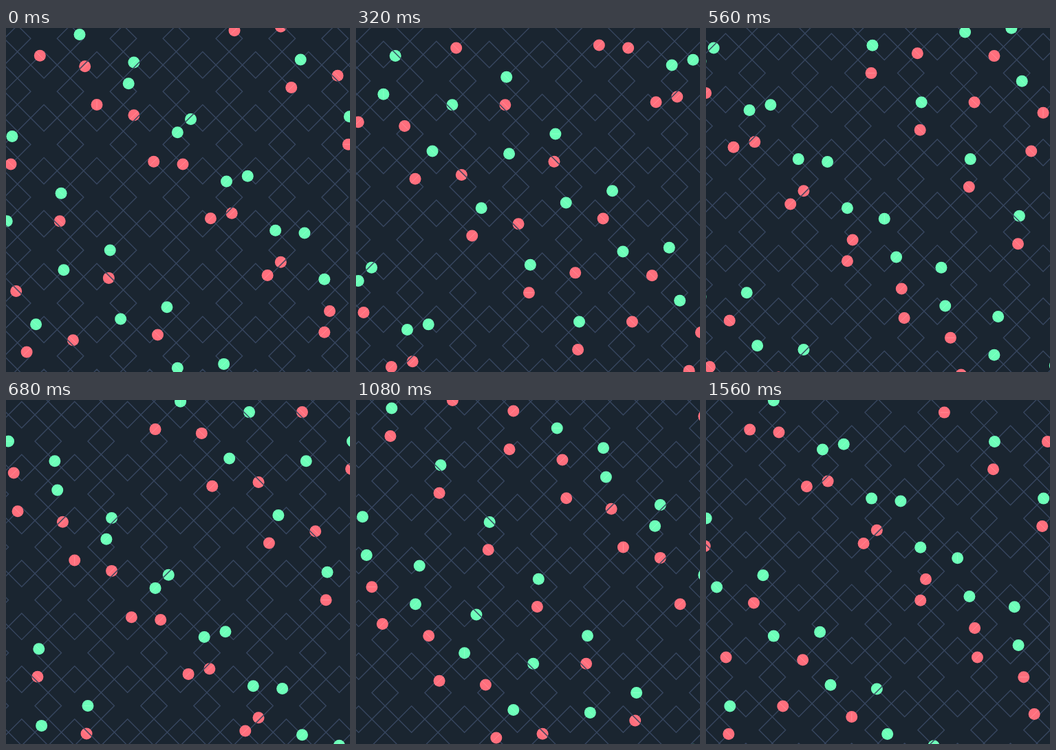
These frames come from a looping animation (500x500 px, 1.6 s). An HTML page with a canvas:

```html
<!DOCTYPE html>
<html>
<head>
<meta charset="utf-8">
<style>
  html, body { margin: 0; width: 100%; height: 100%; overflow: hidden; background: #1a2530; }
  canvas { display: block; }
</style>
</head>
<body>
<canvas id="stage" width="500" height="500"></canvas>
<script>
const ctx = document.getElementById('stage').getContext('2d');
const PITCH = 1000 / 13;        // distance between diamond centres
const RADIUS = PITCH * 0.75;    // centre to corner, so neighbours overlap
const STEPS = 40, STEP_MS = 40;
const DRIFT = 1.9;              // diagonal slide per step
const DOT = 8.5;
const mod = (a, b) => ((a % b) + b) % b;

function diamond(x, y) {
  ctx.strokeStyle = '#37465f';
  ctx.lineWidth = 1.4;
  ctx.beginPath();
  ctx.moveTo(x, y - RADIUS);
  ctx.lineTo(x + RADIUS, y);
  ctx.lineTo(x, y + RADIUS);
  ctx.lineTo(x - RADIUS, y);
  ctx.closePath();
  ctx.stroke();
}

// Clockwise walk round a diamond, starting at the top corner.
function walk(phase) {
  const p = mod(phase, 40);
  const unit = RADIUS / 10;
  return [(10 - Math.abs((p + 10) % 40 - 20)) * unit, (10 - Math.abs(p - 20)) * unit];
}

// A disc with a pale seam at right angles to its track.
function dot(x, y, color, seamX, seamY) {
  ctx.fillStyle = color;
  ctx.beginPath();
  ctx.arc(x, y, DOT, 0, 2 * Math.PI);
  ctx.fill();
  ctx.strokeStyle = 'rgba(255, 255, 255, 0.2)';
  ctx.lineWidth = 1;
  ctx.beginPath();
  ctx.moveTo(x - seamX, y - seamY);
  ctx.lineTo(x + seamX, y + seamY);
  ctx.stroke();
}

function cell(col, row, step) {
  const x = 55.1 + PITCH * col - DRIFT * step;
  const y = 15.3 + PITCH * row - DRIFT * step;
  const red = mod(row - col, 2) === 1;
  diamond(x, y);

  let [dx, dy] = walk((red ? -10.5 : 9) + 11.5 * row - 12.5 * col + step);
  if (red) dx = -dx;
  const seam = DOT * Math.SQRT1_2;
  dot(x + dx, y + dy, red ? '#ff6f7d' : '#6dffb9', Math.sign(dx) * seam, Math.sign(dy) * seam);
}

function draw(time) {
  const step = Math.floor((time + 1) / STEP_MS) % STEPS;
  ctx.fillStyle = '#1a2530';
  ctx.fillRect(0, 0, 500, 500);
  for (let row = -1; row < 9; row++)
    for (let col = 8; col >= -1; col--) cell(col, row, step);
}

function tick(now) {
  draw(now);
  requestAnimationFrame(tick);
}
draw(0);
requestAnimationFrame(tick);
</script>
</body>
</html>
```
